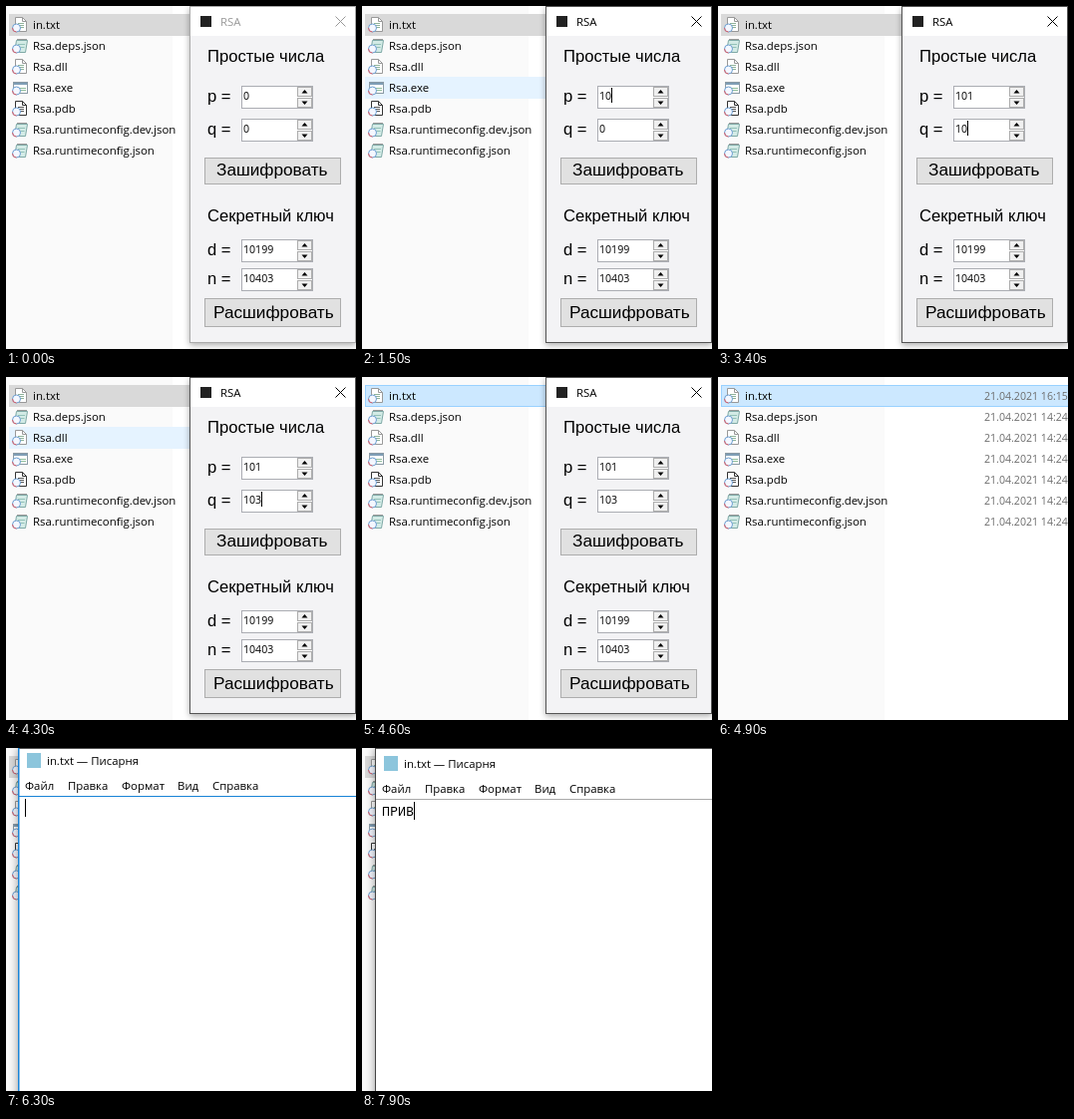
Write an HTML page that moves like this. It is 351 px wide and 344 px high and loops after 8000 ms.

```html
<!DOCTYPE html>
<html lang="ru">
<head>
<meta charset="utf-8">
<style>
html, body { margin: 0; width: 100%; height: 100%; overflow: hidden; background: #fff; }
svg { display: block; width: 351px; height: 344px; }
text { font: 11.4px "Open Sans", "Noto Sans", sans-serif; white-space: pre; }
.num { font-size: 10.6px; }
.label { font: 16.6px "Liberation Sans", Arial, sans-serif; }
.button { font: 17.2px "Liberation Sans", Arial, sans-serif; }
.mono { font: 13.33px "Noto Sans Mono", "DejaVu Sans Mono", monospace; }
</style>
</head>
<body>
<svg id="stage" viewBox="0 0 351 344"></svg>
<script>
const LOOP = 8000;
const stage = document.getElementById('stage');
const files = [
  ['in.txt', 'page'], ['Rsa.deps.json', 'note'], ['Rsa.dll', 'page'], ['Rsa.exe', 'app'],
  ['Rsa.pdb', 'dark'], ['Rsa.runtimeconfig.dev.json', 'note'], ['Rsa.runtimeconfig.json', 'note']
];

// Each track lists [start time, value]; the latest started value holds.
const tracks = {
  hover: [[0, -1], [1500, 3], [1600, -1], [3900, 4], [4100, 3], [4300, 2], [4500, 1], [4600, 0], [5200, -1]],
  p: [[0, '0'], [800, '[0'], [1100, '1|'], [1500, '10|'], [2000, '101|'], [2300, '101']],
  q: [[0, '0'], [2400, '[0'], [2600, '1|'], [3200, '1'], [3400, '10|'], [4100, '103|'], [4500, '103']],
  fade: [[0, 0], [5200, .25], [5300, .55], [5400, .85], [5500, 1]],
  shift: [[0, [-7, -9]], [6100, [-5, -7]], [6200, [-3, -5]], [6300, [-1, -3]], [6400, [0, 0]]],
  typed: [[0, ''], [6300, '|'], [6600, ''], [7100, 'П|'], [7500, 'ПР|'], [7700, 'ПРИ|'], [7900, 'ПРИВ|']]
};
const at = (name, t) => tracks[name].filter(k => k[0] <= t).pop()[1];

const rect = (x, y, w, h, fill, extra = '') =>
  `<rect x="${x}" y="${y}" width="${w}" height="${h}" fill="${fill}" ${extra}/>`;
const box = (x, y, w, h, fill, line) =>
  rect(x + .5, y + .5, w - 1, h - 1, fill, `stroke="${line}"`);
const text = (x, y, s, cls = '', fill = '#000') =>
  `<text x="${x}" y="${y}" class="${cls}" fill="${fill}">${s}</text>`;
const path = (d, line, fill = 'none', width = 1) =>
  `<path d="${d}" stroke="${line}" fill="${fill}" stroke-width="${width}"/>`;

function icon(y, kind) {
  let s;
  if (kind === 'app') {
    s = box(7, y + 2, 15, 12, '#fff', '#8a9aa5') + rect(8, y + 3, 13, 2, '#7e9db5') +
      path(`M13 ${y + 8.5}h7M13 ${y + 10.5}h7`, '#8ebd9b');
  } else if (kind === 'note') {
    s = path(`M10.5 ${y + 2.5}h11l-2 12h-11z`, '#7fa9a6', '#d3ebe6') +
      path(`M11 ${y + 1.5}h10`, '#999') +
      path(`M12 ${y + 6.5}h7M11.5 ${y + 9.5}h7`, '#93c1b8');
  } else {
    const line = kind === 'dark' ? '#333' : '#999';
    s = path(`M9.5 ${y + .5}h7l4 4v10h-11z`, line, '#fff') + path(`M16.5 ${y + .5}v4h4`, line) +
      path(`M12 ${y + 6.5}h6M12 ${y + 8.5}h6M12 ${y + 10.5}h6`, kind === 'dark' ? '#555' : '#8fb39b');
  }
  return s + `<circle cx="10.5" cy="${y + 11}" r="4" fill="#f4f7ff" stroke="#6d9fd0"/>` +
    path(`M6.5 ${y + 11}a4 4 0 0 0 4 4`, '#dc5f68');
}

function explorer(hover) {
  let s = rect(0, 0, 167, 344, '#fafafa');
  files.forEach(([name, kind], i) => {
    const y = 8 + 21 * i;
    if (i === 0) s += hover === 0 ? box(3, y, 360, 22, '#cce8ff', '#99d1ff') : rect(3, y, 348, 22, '#d9d9d9');
    else if (i === hover) s += rect(3, y, 348, 22, '#e5f3ff');
    s += icon(y + 3, kind) + text(27, y + 15, name) +
      text(267, y + 15, '21.04.2021 ' + (i ? '14:24' : '16:15'), 'num', '#6d6d6d');
  });
  return s;
}

function field(y, value) {
  const digits = value.replace(/[[|]/g, ''), selected = value[0] === '[';
  let s = box(236, y, 72, 23, '#fff', '#abadb3');
  if (selected) s += rect(238, y + 2, 6 * digits.length + 1, 15, '#0078d7');
  s += text(238, y + 14, digits, 'num', selected ? '#fff' : '#000');
  if (value.endsWith('|')) s += rect(238 + 6 * digits.length, y + 2, 1, 15, '#000');
  for (const [top, dir] of [[y + 1, -1], [y + 12, 1]]) {
    const m = top + 5;
    s += box(292, top, 15, 10, '#f0f0f0', '#adadad') +
      `<path d="M296.5 ${m - dir * 1.5}h6l-3 ${dir * 3.5}z"/>`;
  }
  return s;
}

const button = (x, y, w, h, tx, s) => box(x, y, w, h, '#e1e1e1', '#adadad') + text(tx, y + h - 9, s, 'button');

function form(active, p, q) {
  const ink = active ? '#000' : '#999';
  return `<g filter="drop-shadow(0 2px 3px #0005)">${box(184, 0, 167, 338, '#f3f3f5', active ? '#555' : '#aaa')}</g>` +
    rect(185, 1, 165, 29, '#fff') + rect(195, 10, 11, 11, '#222') + text(215, 19.5, 'RSA', '', ink) +
    path('M330.5 10.5l10 10M340.5 10.5l-10 10', ink) +
    text(202, 56, 'Простые числа', 'label') + text(202, 216, 'Секретный ключ', 'label') +
    [['p', 80, p], ['q', 113, q], ['d', 234, '10199'], ['n', 263, '10403']].map(([name, y, v]) =>
      text(202, y + 16, name + ' =', 'label') + field(y, v)).join('') +
    button(199, 152, 137, 27, 211, 'Зашифровать') + button(199, 293, 137, 29, 208, 'Расшифровать');
}

function editor(settled, fade, [dx, dy], typed) {
  const word = typed.replace('|', '');
  const menu = [[20, 'Файл'], [63, 'Правка'], [117, 'Формат'], [173, 'Вид'], [208, 'Справка']];
  const accent = '#1883d7';
  return `<g opacity="${fade}"><g transform="translate(${dx} 0)">` +
    `<g filter="drop-shadow(0 0 5px #0006)">${rect(13, 0, 400, 400, '#fff')}</g>` +
    rect(13, 0, 400, 1, '#555') + rect(13, 0, settled ? 1 : 1.5, 400, settled ? '#444' : accent) +
    `<g transform="translate(0 ${dy})">` + rect(22, 8, 14, 15, '#8cc5dc') +
    text(42, 20, 'in.txt — Писарня') + menu.map(([x, s]) => text(x, 45, s)).join('') +
    rect(14, 51, 400, 1, settled ? '#a9a9a9' : accent) + text(20, 68, word, 'mono') +
    (typed.endsWith('|') ? rect(20 + 8 * word.length, 54, 1, 18, '#000') : '') + '</g></g></g>';
}

function scene(t) {
  const get = name => at(name, t);
  const fade = get('fade');
  return explorer(get('hover')) +
    (t < 4900 ? form(t >= 600, get('p'), get('q')) : '') +
    (fade ? editor(t >= 6400, fade, get('shift'), get('typed')) : '');
}

const start = performance.now();
let shown = '';
function draw() {
  const next = scene((performance.now() - start) % LOOP);
  if (next !== shown) stage.innerHTML = shown = next;
  requestAnimationFrame(draw);
}
draw();
</script>
</body>
</html>
```
